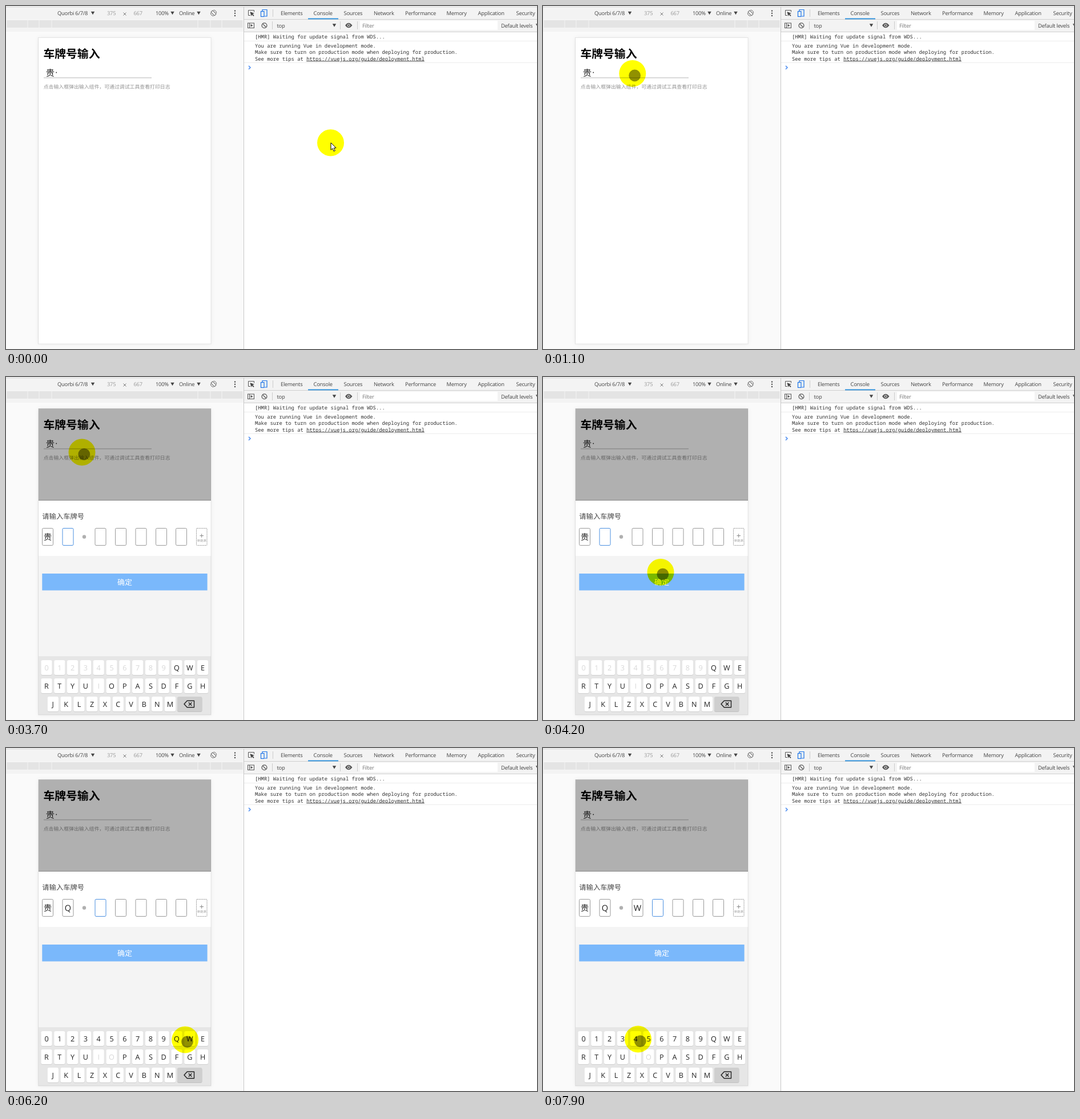
Animation of 930 by 602 pixels, one loop 8000 ms. Source, as an HTML page:

```html
<!DOCTYPE html>
<html lang="zh-CN">
<head>
<meta charset="utf-8">
<title>车牌号输入</title>
<style>
html, body { margin: 0; width: 100%; height: 100%; overflow: hidden; background: #fff; }
svg { display: block; isolation: isolate; }
text { font: 9.4px "Open Sans", "Noto Sans", sans-serif; letter-spacing: -.25px; fill: #444; text-rendering: geometricPrecision; white-space: pre; }
.cjk { font-family: "Noto Sans CJK SC", "Noto Sans CJK", sans-serif; letter-spacing: 0; }
.log { font: 8.83px "Noto Sans Mono", "DejaVu Sans Mono", monospace; letter-spacing: 0; fill: #303030; }
.key { font-size: 12.6px; letter-spacing: 0; text-anchor: middle; }
.halo { mix-blend-mode: multiply; }
</style>
</head>
<body>
<svg id="stage" width="930" height="602" viewBox="0 0 930 602">
  <defs>
    <clipPath id="screen"><rect x="57" y="55.5" width="302" height="537.5"/></clipPath>
    <filter id="soft" x="-10%" y="-10%" width="120%" height="120%"><feGaussianBlur stdDeviation="5"/></filter>
  </defs>
  <g id="tools"></g>
  <g id="page"></g>
  <g clip-path="url(#screen)">
    <rect id="shade" x="57" y="55" width="302" height="538"/>
    <g id="panel"></g>
  </g>
  <rect x="56.5" y="55.5" width="302.5" height="537.5" fill="none" stroke="#000" stroke-opacity=".09"/>
  <rect id="caret" x="436" y="102" width="1" height="12" fill="#222"/>
  <g id="pointer">
    <circle class="halo" r="23.5" fill="#ff0"/>
    <circle id="touch" cx="3.8" cy="3.6" r="10.4" fill-opacity=".43"/>
    <path id="arrow" d="M.5 0V12.6L3.4 9.9L5.6 14.9L7.8 13.9L5.7 9.1H9.6Z" fill="#fff" stroke="#000" stroke-width="1"/>
  </g>
</svg>
<script>
const $ = id => document.getElementById(id);

function add(parent, tag, attrs, text) {
  const el = document.createElementNS("http://www.w3.org/2000/svg", tag);
  for (const k in attrs) el.setAttribute(k, attrs[k]);
  if (text !== undefined) el.textContent = text;
  return parent.appendChild(el);
}
const rect = (g, x, y, width, height, fill, more) => add(g, "rect", { x, y, width, height, fill, ...more });
const label = (g, x, y, str, more) => add(g, "text", { x, y, ...more }, str);
const line = (g, d, stroke, width = 1, more) =>
  add(g, "path", { d, stroke, fill: "none", "stroke-width": width, ...more });
const caretDown = (g, x, y, s = 3.2) =>
  add(g, "path", { d: `M${x - s} ${y - 2.7}h${2 * s}l${-s} 5.4z`, fill: "#444" });

function buildTools(g) {
  rect(g, 0, 0, 930, 602, "#fff");
  rect(g, 0, 39, 416, 563, "#fafafa");
  rect(g, 0, 1, 930, 44, "#f3f3f3");
  rect(g, 0, 1, 930, 1, "#cfcfcf");

  // device bar
  label(g, 90, 16, "Quorbi 6/7/8");
  label(g, 177, 16, "375", { style: "fill:#999" });
  label(g, 223.5, 16, "667", { style: "fill:#999" });
  line(g, "M205.5 11.5l5 5m0-5l-5 5", "#777");
  label(g, 262, 16, "100%");
  label(g, 303, 16, "Online");
  for (const x of [152, 291.5, 337.5]) caretDown(g, x, 12.5);
  const turn = add(g, "g", { transform: "translate(363.5 12.3)" });
  rect(turn, -2.2, -4.4, 4.4, 8.8, "none", { stroke: "#666", transform: "rotate(-45)", rx: .6 });
  line(turn, "M0-5.2A5.2 5.2 0 0 1 5.2 0M0 5.2A5.2 5.2 0 0 1-5.2 0", "#666");
  for (const y of [8.5, 12.7, 17]) add(g, "circle", { cx: 401, cy: y, r: 1.25, fill: "#555" });
  rect(g, 0, 23, 416, 16, "#f5f5f5");
  const stops = [1, 38, 58, 80, 336, 358, 378, 415];
  stops.slice(1).forEach((end, i) => rect(g, stops[i] + .5, 25, end - stops[i] - 1, 13, "#e4e4e4"));

  // tab row
  rect(g, 416, 1, 1, 601, "#c8c8c8");
  rect(g, 417, 23, 513, 1, "#d0d0d0");
  line(g, "M428 16.5H424.5V7.5H434.5V10.5", "#555");
  add(g, "path", { d: "M427.5 10l7.5 3-3 1.1 2.6 2.7-1.2 1.2-2.6-2.7-1.2 2.7z", fill: "#444" });
  line(g, "M449 9V6.5h8V18h-4", "#1a73e8", 1.2);
  rect(g, 446.5, 9.5, 5.5, 9, "none", { stroke: "#1a73e8", "stroke-width": 1.2 });
  line(g, "M467.5 6v13", "#ccc");
  const tabs = { Elements: 481, Console: 538.5, Sources: 591.5, Network: 644, Performance: 699,
    Memory: 771.5, Application: 826.5, Security: 893.5 };
  for (const name in tabs) label(g, tabs[name], 16, name);
  rect(g, 529, 21.5, 53, 1.8, "#2b90dd");

  // console bar
  rect(g, 423.5, 30, 11, 8.5, "none", { stroke: "#555" });
  line(g, "M426.5 30v8.5", "#555");
  add(g, "path", { d: "M428.5 31.8l4 2.4-4 2.4z", fill: "#555" });
  add(g, "circle", { cx: 452.5, cy: 34.2, r: 4.4, fill: "none", stroke: "#555", "stroke-width": 1.3 });
  line(g, "M449.4 31.1l6.2 6.2", "#555", 1.3);
  line(g, "M466.5 27v14M585.5 27v14M615.5 27v14", "#ccc");
  label(g, 474.5, 37.5, "top");
  caretDown(g, 575, 34);
  add(g, "path", { d: "M594 34q6-8.5 12.5 0q-6.5 8.5-12.5 0z", fill: "#555" });
  add(g, "circle", { cx: 600.2, cy: 34, r: 2.1, fill: "#555", stroke: "#f3f3f3" });
  rect(g, 620, 26, 241, 16, "#fff");
  label(g, 624, 38, "Filter", { style: "fill:#777" });
  label(g, 867, 37.5, "Default levels");
  caretDown(g, 931, 34);
  rect(g, 417, 45, 513, 1, "#d0d0d0");

  // log
  const log = (y, str, x = 436, more) => label(g, x, y, str, { class: "log", ...more });
  log(57, "[HMR] Waiting for update signal from WDS...");
  log(73.1, "You are running Vue in development mode.");
  log(84.3, "Make sure to turn on production mode when deploying for production.");
  log(95.5, "See more tips at ");
  log(95.5, "https://vuejs.org/guide/deployment.html", 526.2, { "text-decoration": "underline" });
  line(g, "M417 61.5H930M417 99.5H930", "#ededed");
  line(g, "M425 105l3 3-3 3", "#3b82f0", 1.4);
}

function buildPage(g) {
  rect(g, 57, 56, 302, 537, "#000", { opacity: .06, filter: "url(#soft)" });
  rect(g, 57, 55.5, 302, 537.5, "#fff");
  const cjk = (x, y, str, style) => label(g, x, y, str, { class: "cjk", style });
  cjk(65.5, 91.4, "车牌号输入", "font-size:19.8px;font-weight:700;fill:#000");
  cjk(69.8, 122.7, "贵", "font-size:15.3px;fill:#222");
  label(g, 88, 122, "·", { style: "font-size:15px;text-anchor:middle;fill:#222" });
  line(g, "M66 126H255", "#b4b4b4");
  cjk(65.7, 145.2, "点击输入框弹出输入组件，可通过调试工具查看打印日志", "font-size:8.88px;fill:#949494");
}

const slots = [], keys = [];
function buildPanel(g) {
  rect(g, 57, 215.5, 302, 2, "#000", { opacity: .12 });
  rect(g, 57, 217, 302, 98, "#fff");
  rect(g, 57, 314, 302, 177, "#f4f4f4");
  rect(g, 57, 490, 302, 103, "#e6e6e6");
  label(g, 63.3, 249, "请输入车牌号", { class: "cjk", style: "font-size:12.3px;fill:#444" });

  [63.5, 99, 156, 191.5, 227, 262.5, 297.5].forEach((x, i) => {
    const box = rect(g, x, 265.5, 19, 30, "#fff", { rx: 2 });
    const text = label(g, x + 9.5, 286.4, i ? "" : "贵", {
      class: i ? "key" : "key cjk", style: "font-size:14.5px;fill:#222" });
    slots.push({ box, text });
  });
  add(g, "circle", { cx: 137, cy: 280.5, r: 3.2, fill: "#b0b0b0" });
  rect(g, 333.5, 265.5, 18.5, 30, "#fff", { rx: 1, stroke: "#999", "stroke-dasharray": "2 1" });
  line(g, "M339.5 278.5h6.5M342.7 275.3v6.5", "#888");
  label(g, 342.8, 288.6, "新能源", { class: "cjk", style: "font-size:5.2px;text-anchor:middle;fill:#999" });

  rect(g, 63.3, 345, 289.3, 29.5, "#7ab8fb");
  label(g, 208, 365, "确定", { class: "cjk", style: "font-size:13px;text-anchor:middle;fill:#fff" });

  ["0123456789QWE", "RTYUIOPASDFGH", "JKLZXCVBNM"].forEach((row, r) => {
    [...row].forEach((ch, i) => {
      const x = (r == 2 ? 82.3 : 71) + 22.8 * i, y = 497 + 32 * r;
      rect(g, x - 9.6, y + 1, 19.2, 26, "#cfcfcf", { rx: 3 });
      rect(g, x - 9.6, y, 19.2, 26, "#fff", { rx: 3 });
      keys.push({ ch, el: label(g, x, y + 17.7, ch, { class: "key" }) });
    });
  });
  rect(g, 300, 562, 43.5, 26, "#c2c2c2", { rx: 3 });
  rect(g, 300, 561, 43.5, 26, "#cfcfcf", { rx: 3 });
  line(g, "M312 574l5.2-5.8H329.5v11.6H317.2z", "#222", 1.4, { "stroke-linejoin": "round" });
  line(g, "M319.8 571.2l5.6 5.6m0-5.6l-5.6 5.6", "#222", 1.4);
}

// time, x, y
const path = [
  [0, 568.5, 240], [200, 538, 233], [500, 385, 188], [700, 262, 149], [900, 181, 126],
  [1100, 156.8, 118.4], [1300, 142, 114], [1600, 132, 131], [1800, 130.5, 120.5],
  [2900, 130.5, 120.5], [3100, 130.8, 120.7], [3300, 130.5, 120.5], [3600, 130.5, 120.5],
  [3700, 133, 132], [3900, 148, 185], [4100, 183, 285], [4300, 229, 400], [4500, 267, 487],
  [4700, 294, 508], [4900, 304.5, 514.5], [5000, 306, 519], [5300, 304.5, 515], [5500, 304.5, 515],
  [6000, 312, 512.5], [6200, 313.7, 512], [6500, 314.5, 512], [7200, 348, 512], [7300, 348, 512],
  [7500, 292, 525], [7700, 212, 518], [7900, 166.5, 511]
];
function pointerAt(t) {
  const i = path.findIndex(p => p[0] >= t), b = path[i], a = path[Math.max(i - 1, 0)];
  const k = b[0] > a[0] ? (t - a[0]) / (b[0] - a[0]) : 0;
  return [a[1] + (b[1] - a[1]) * k, a[2] + (b[2] - a[2]) * k];
}

function draw(now) {
  const t = Math.floor(now % 8000 / 100) * 100;
  const open = t >= 3300 ? 1 : t >= 3200 ? .5 : 0;
  const typed = t >= 6500 ? "QW" : t >= 5500 ? "Q" : "";
  const off = typed ? "IO" : "0123456789I";

  $("shade").setAttribute("fill-opacity", .31 * open);
  $("panel").setAttribute("transform", `translate(0 ${376 * (1 - open)})`);
  $("panel").style.display = open ? "" : "none";
  slots.forEach(({ box, text }, i) => {
    if (i) text.textContent = typed[i - 1] || "";
    box.setAttribute("stroke", i == typed.length + 1 ? "#4a8fe0" : "#999");
  });
  for (const { ch, el } of keys) el.style.fill = off.includes(ch) ? "#d8d8d8" : "#222";

  $("caret").style.display = t < 3300 && t % 1000 >= 200 && t % 1000 < 700 ? "" : "none";
  const [x, y] = pointerAt(t), inside = x < 359;
  // positions are set per child so the halo blends with the page
  for (const el of $("pointer").children) el.setAttribute("transform", `translate(${x} ${y})`);
  $("touch").style.display = inside ? "" : "none";
  $("arrow").style.display = inside ? "none" : "";
}

buildTools($("tools"));
buildPage($("page"));
buildPanel($("panel"));
(function tick() {
  draw(performance.now());
  requestAnimationFrame(tick);
})();
</script>
</body>
</html>
```
